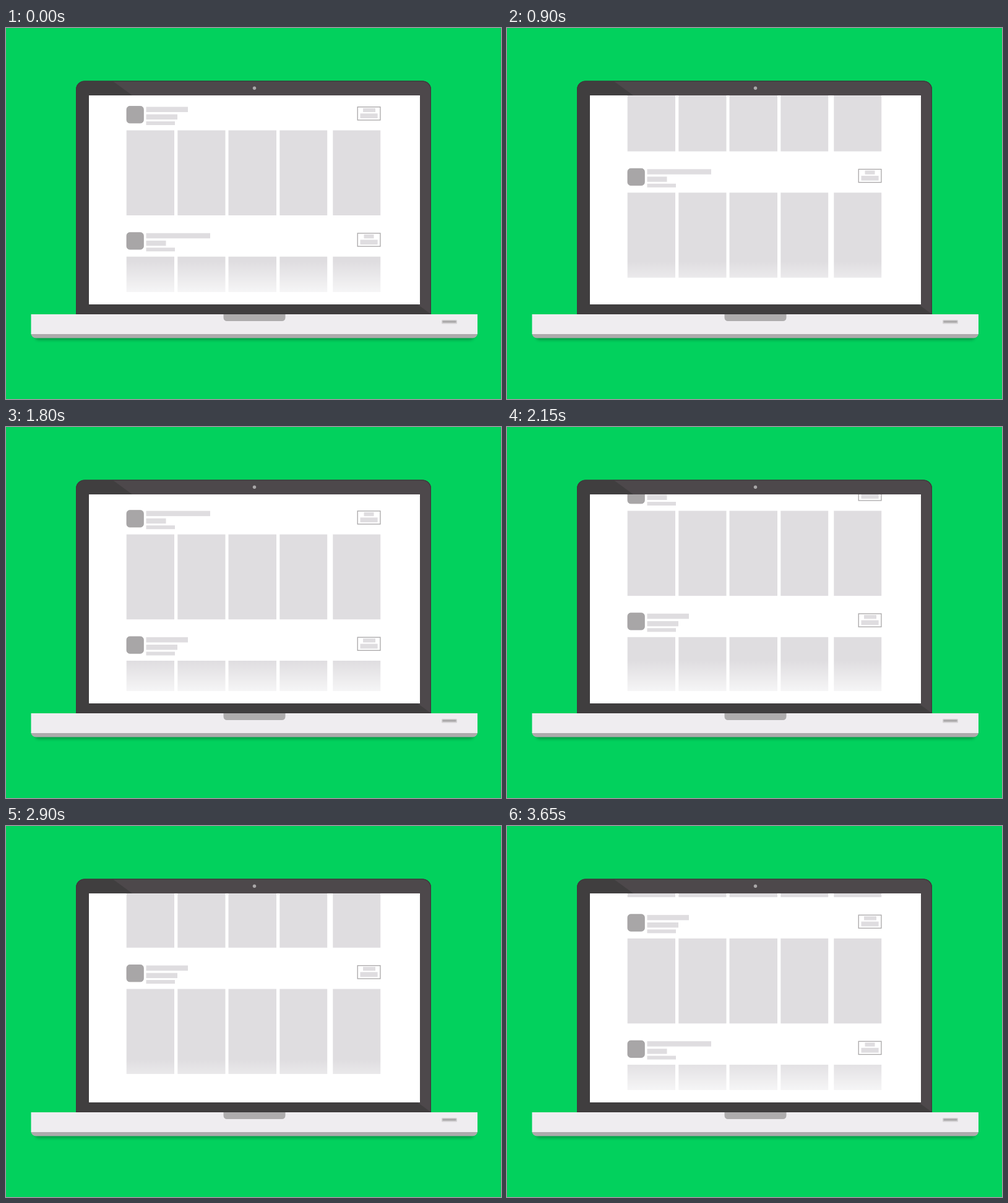
Animation of 800 by 600 pixels, one loop 3750 ms. Source, as an HTML page:

```html
<!DOCTYPE html>
<html lang="en">
<head>
<meta charset="utf-8">
<title>Scrolling laptop</title>
<style>
  html, body { margin: 0; width: 100%; height: 100%; overflow: hidden; background: #02d15d; }
  svg { display: block; width: 800px; height: 600px; }
</style>
</head>
<body>
<svg viewBox="0 0 800 600">
  <defs>
    <clipPath id="page"><rect x="134" y="109" width="535" height="318"/></clipPath>
    <clipPath id="lid"><path id="lidShape" d="M113 463V99.500a14 14 0 0 1 14-14H673a14 14 0 0 1 14 14V463z"/></clipPath>
    <linearGradient id="fade" x2="0" y2="1">
      <stop stop-color="#fff" stop-opacity="0"/>
      <stop offset="1" stop-color="#fff"/>
    </linearGradient>
    <filter id="blur" x="-5%" y="-50%" width="110%" height="200%"><feGaussianBlur stdDeviation="2"/></filter>
  </defs>

  <rect x="46" y="490" width="711" height="15" rx="7" fill="#02853d" opacity=".65" filter="url(#blur)"/>

  <g clip-path="url(#lid)">
    <rect x="113" y="85" width="574" height="378" fill="#403e3f"/>
    <path d="M172 85.500H687V463z" fill="#4d484b"/>
    <use href="#lidShape" fill="none" stroke="#3d3a3c" stroke-width="2.500"/>
  </g>
  <circle cx="401.500" cy="97.300" r="2.700" fill="#aaa8a9"/>
  <rect x="134" y="109" width="535" height="338" fill="#fff"/>

  <g clip-path="url(#page)">
    <g id="list"></g>
    <rect x="134" y="377" width="535" height="70" fill="url(#fade)"/>
  </g>

  <path d="M40.500 494H762a8 7.500 0 0 1-8 7.500H48.500a8 7.500 0 0 1-8-7.500z" fill="#adabac"/>
  <rect x="40.500" y="463" width="721.500" height="32" fill="#efedf0"/>
  <path d="M351.500 463H451.500V468.500a5.500 5.500 0 0 1-5.500 5.500H357a5.500 5.500 0 0 1-5.500-5.500z" fill="#aeacad"/>
  <rect x="704" y="472" width="25" height="6.500" rx="1.500" fill="#d3d1d3"/>
  <rect x="705.500" y="473.500" width="22" height="3" rx="1" fill="#a9a7a8"/>
</svg>
<script>
const LOOP = 3750, TICK = 50, ROW = 204.25;
const STEP = 2 * ROW / (LOOP / TICK);
const list = document.getElementById('list');

const bar = (x1, y1, x2, y2) =>
  `<rect x="${x1}" y="${y1}" width="${x2 - x1}" height="${y2 - y1}" fill="#dfdde0"/>`;

function row(index) {
  const odd = index % 2;
  const cards = [[194.7, 272], [277.3, 354.5], [359.5, 437], [442.3, 519.2], [528.3, 605.2]];
  return `<g transform="translate(0 ${index * ROW})">
    <rect x="195" y="126.500" width="27.300" height="27.300" rx="5" fill="#a8a6a7" stroke="#a09e9f" stroke-width=".8"/>
    <rect x="568.200" y="127.700" width="36.700" height="21.200" fill="#fff" stroke="#a8a6a7" stroke-width="1.300"/>` +
    bar(226.5, 127.5, odd ? 330 : 294, 136) +
    bar(226.5, 139.6, odd ? 258.5 : 277, 148) +
    bar(226.5, 151, 273, 157) +
    bar(odd ? 578.5 : 577, 129.7, odd ? 594.5 : 597, 136) +
    bar(572.5, 138.2, 600.6, 146) +
    cards.map(([x1, x2]) => bar(x1, 165.5, x2, 303)).join('') + '</g>';
}
list.innerHTML = [0, 1, 2, 3].map(row).join('');

// Scroll advances once per tick, skips around the loop point and pauses three times.
function scrollSteps(tick) {
  if (tick < 2) return 0;
  return Math.min(72, tick + 1 - (tick >= 25) - (tick >= 49));
}

function draw(now) {
  const tick = Math.floor(now % LOOP / TICK);
  list.setAttribute('transform', `translate(0 ${-scrollSteps(tick) * STEP})`);
  requestAnimationFrame(draw);
}
draw(performance.now());
</script>
</body>
</html>
```
